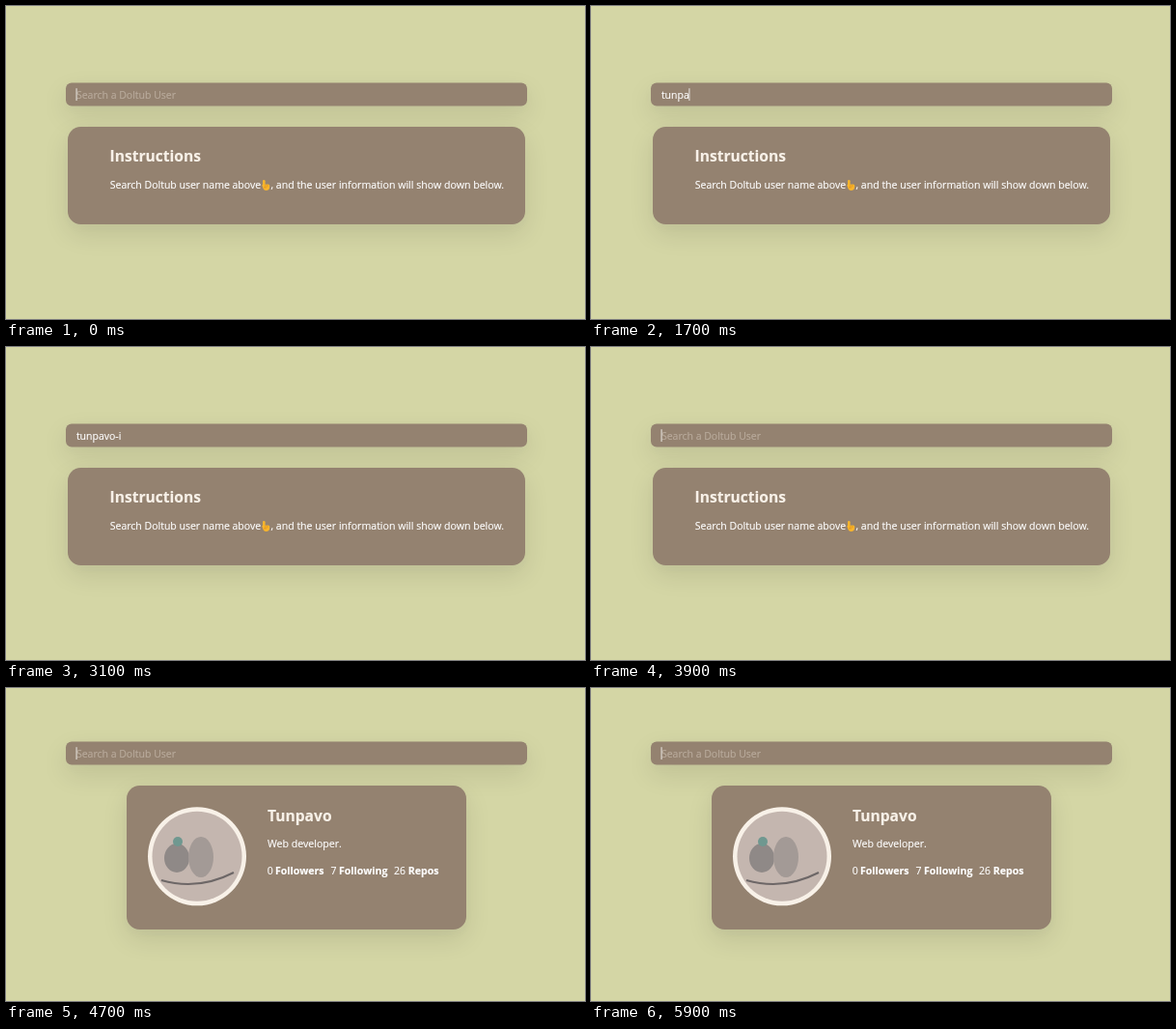
Animation, 600 px wide and 324 px high, one loop 6100 ms. Source, as an HTML page:

```html
<!DOCTYPE html>
<html lang="en">
<head>
<meta charset="utf-8">
<title>User search</title>
<style>
  html, body { margin: 0; width: 100%; height: 100%; overflow: hidden; background: #d4d6a5; }
  #stage { position: absolute; left: 0; top: 0; width: 600px; height: 324px; overflow: hidden; background: #d4d6a5; }
  .panel {
    position: absolute;
    background: #948270;
    box-shadow: 0 3px 7px rgba(154, 160, 185, .05), 0 10px 27px rgba(0, 0, 0, .1);
  }
  #bar { left: 62px; top: 0; width: 478px; height: 24px; border-radius: 6px; }
  .card { border-radius: 13.5px; }
  #help { left: 64px; top: 125px; width: 474px; height: 101px; }
  #profile { left: 125px; top: 101px; width: 352px; height: 149px; }
  svg { position: absolute; left: 0; top: 0; overflow: visible; }
  text {
    font: 10.5px "Open Sans", "Noto Sans", sans-serif;
    color: #fff; fill: currentColor; stroke: currentColor; stroke-width: .15px;
    white-space: pre;
  }
  .title { font-size: 15.6px; font-weight: 700; color: #f8f1e8; }
  .label { font-size: 10.6px; font-weight: 700; }
  #hint { color: #b9ab9c; }
</style>
</head>
<body>
<div id="stage">
  <div class="panel" id="bar">
    <svg width="478" height="24">
      <text id="hint" x="10.9" y="16.3">Search a Doltub User</text>
      <text id="typed" x="10.9" y="16.3"></text>
      <rect id="caret" x="10.6" y="5.7" width=".9" height="12.8" fill="#fff" opacity=".9"/>
    </svg>
  </div>

  <div class="panel card" id="help">
    <svg width="474" height="101">
      <text class="title" x="43.5" y="36.2">Instructions</text>
      <text x="43.8" y="63.9">Search Doltub user name above</text>
      <g fill="#f9b52c">
        <rect x="202" y="55" width="2.6" height="7.5" rx="1.3"/>
        <path d="M201.3 60.5Q201.5 59.6 203 59.7L208 59.4Q209.4 59.8 209.3 61.5L208.8 64.3Q208 66 205.6 66Q203.4 66 202.5 64Z"/>
        <path d="M204.8 60v2.5M206.8 60v2.3M203 62.9h3" fill="none" stroke="#d98718" stroke-width=".6"/>
      </g>
      <text x="210.4" y="63.9" style="font-size:10.6px">, and the user information will show down below.</text>
    </svg>
  </div>

  <div class="panel card" id="profile">
    <svg width="352" height="149">
      <circle cx="73" cy="73.3" r="51" fill="#f8f1e8"/>
      <circle cx="73" cy="73.3" r="46.5" fill="#c4b6af"/>
      <ellipse cx="52" cy="75" rx="13" ry="15" fill="#8f8987"/>
      <ellipse cx="77" cy="74" rx="13" ry="21" fill="#a39a96"/>
      <circle cx="53" cy="58" r="5" fill="#6f9890"/>
      <path d="M36 98Q74 109 111 90" fill="none" stroke="#6d6767" stroke-width="2"/>
      <text class="title" x="146" y="36.5">Tunpavo</text>
      <text x="146" y="64.3" style="font-size:10.6px">Web developer.</text>
      <text x="145.7" y="91.7">0</text>
      <text class="label" x="154" y="91.7">Followers</text>
      <text x="211.6" y="91.7">7</text>
      <text class="label" x="220" y="91.7">Following</text>
      <text x="277" y="91.7">26</text>
      <text class="label" x="291.8" y="91.7">Repos</text>
    </svg>
  </div>
</div>
<script>
const LOOP = 6100;
const NAME = 'tunpavo-i';
const KEYS = [1300, 1400, 1500, 1600, 1700, 1800, 2000, 2400, 2700];
const CLEAR = 3900, FOUND = 4100;
const BLINKS = [500, 900, 3100, 3600, 4200, 4700, 5400, 5900];

const $ = id => document.getElementById(id);
const [bar, hint, typed, caret, help, profile] =
  ['bar', 'hint', 'typed', 'caret', 'help', 'profile'].map($);
const show = (el, on) => { el.style.visibility = on ? 'visible' : 'hidden'; };
const passed = (times, t) => times.filter(at => at <= t).length;

function draw(t) {
  const count = t < CLEAR ? passed(KEYS, t) : 0;
  const found = t >= FOUND;
  typed.textContent = NAME.slice(0, count);
  caret.setAttribute('x', 10.6 + (count ? typed.getComputedTextLength() : 0));
  show(hint, !count);
  show(caret, passed(BLINKS, t) % 2 === 0);
  show(help, !found);
  show(profile, found);
  bar.style.transform = `translateY(${found ? 55.5 : 79.5}px)`;
}

const start = performance.now();
function tick() {
  draw((performance.now() - start) % LOOP);
  requestAnimationFrame(tick);
}
tick();
</script>
</body>
</html>
```
